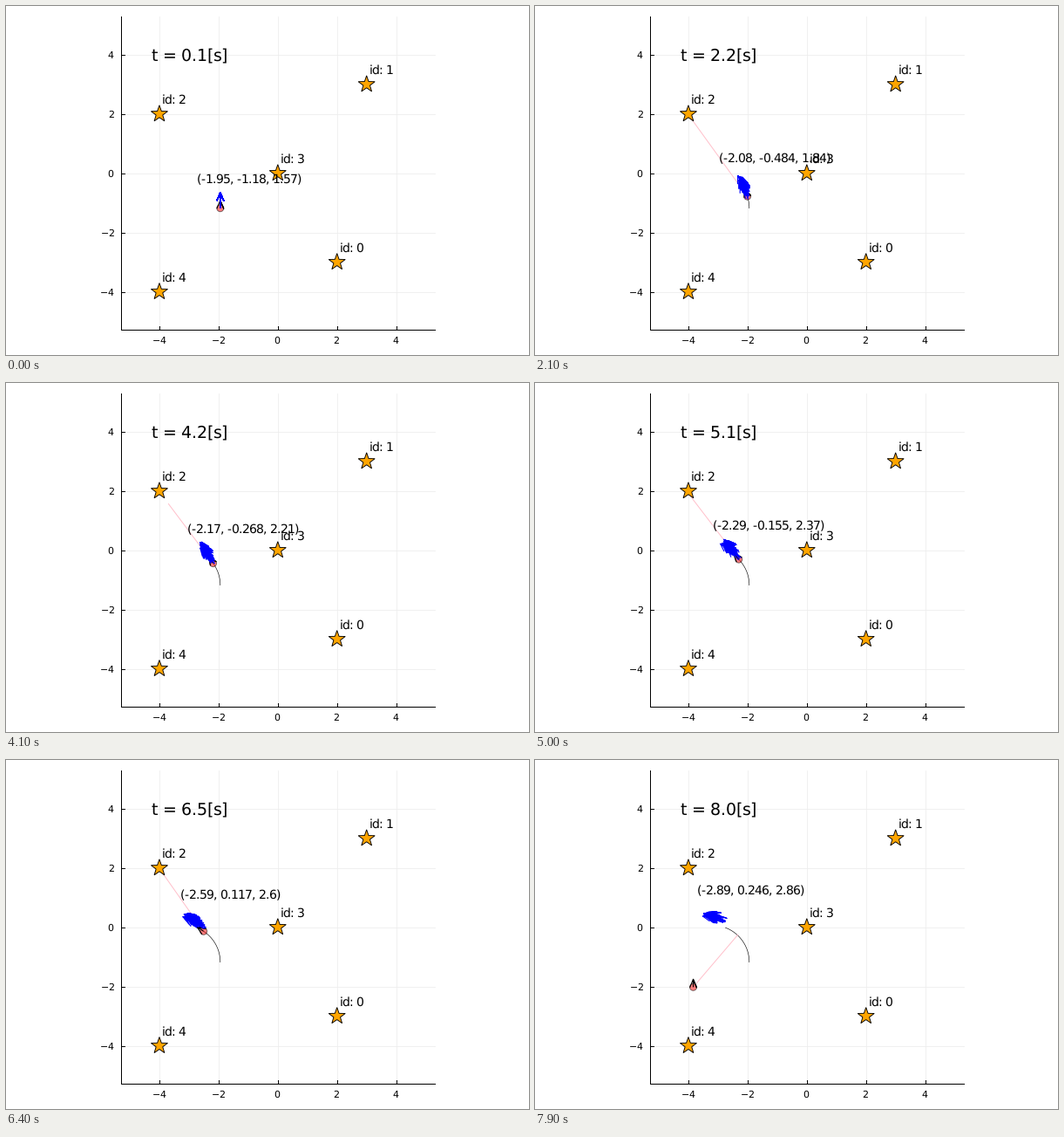
These frames come from a looping animation (600 by 400 pixels, 8 s). A matplotlib script:

```python
from functools import lru_cache

import numpy as np
import matplotlib.pyplot as plt
from matplotlib.animation import FuncAnimation
from matplotlib.collections import LineCollection
from matplotlib.patches import Circle, PathPatch, Polygon
from matplotlib.path import Path
from matplotlib.textpath import TextPath

W, H, DPI = 600, 400, 100
PX = 72 / DPI                        # one pixel in points
FRAMES, STEP = 80, 100
CX, CY, UNIT = 311.8, 191.7, 33.96   # plot centre and pixels per metre
LEFT, RIGHT, TOP, BOTTOM = 132, 492, 12, 371
SMALL, MEDIUM, LARGE = (round(pt * DPI / 72) for pt in (8, 10, 14))
FONT = {"family": "DejaVu Sans"}

LANDMARKS = [(2, -3), (3, 3), (-4, 2), (0, 0), (-4, -4)]

# The robot drives a circular arc, then is carried off at the last step
T0, START = 0.1, (245.8, 231.7)
SPEED, TURN = 6.55, 0.155            # px/s and rad/s
KIDNAPPED, LAST_SIGHT = (181.5, 260.3, np.pi / 2), (233, 200)

# Particle cloud: drift from the true path and spread
DRIFT, CLOUD_TURN, COUNT = (-0.35, -1.1), 0.162, 40

# Key estimates: time, x, y, heading
EST = np.array([
    (0.1, -1.95, -1.18, 1.57), (1.0, -1.97, -0.854, 1.72),
    (2.2, -2.08, -0.484, 1.84), (4.2, -2.17, -0.268, 2.21),
    (5.9, -2.39, -0.0549, 2.52), (7.1, -2.8, 0.289, 2.69),
    (8.0, -2.89, 0.246, 2.86),
])


def to_px(x, y):
    return CX + x * UNIT, CY - y * UNIT


@lru_cache(None)
def advance(ch):
    """Advance width of a glyph in em."""
    right = [TextPath((0, 0), s, size=100, prop=FONT).get_extents().x1
             for s in (ch + "|", "|")]
    return (right[0] - right[1]) / 100


@lru_cache(None)
def glyph(ch, size):
    path = TextPath((0, 0), ch, size=size, prop=FONT)
    return Path(path.vertices * (1, -1), path.codes)


def text_path(text, x, y, size, align=0.5):
    """Text with whole-pixel advances, placed by its ink and centred on y."""
    pen, verts, codes = 0, [], []
    for ch in text:
        if ch != " ":
            g = glyph(ch, size)
            verts.append(g.vertices + (pen, 0))
            codes.append(g.codes)
        pen += int(advance(ch) * size)
    path = Path(np.concatenate(verts), np.concatenate(codes))
    box = path.get_extents()
    dx = round(x - box.x0 - align * box.width)
    dy = round(y + 0.365 * size)
    return Path(path.vertices + (dx, dy), path.codes)


def arrow(x, y, heading, length, back=9, half=3.9):
    d = np.array([np.cos(heading), -np.sin(heading)])
    n = np.array([-d[1], d[0]])
    tail = np.array([x, y])
    tip = tail + length * d
    base = tip - back * d
    return [tail, tip, base + half * n, tip, base - half * n]


def number(v):
    s = f"{v:.3g}"
    return s if "." in s else s + ".0"


def robot_at(t):
    a, r = TURN * (t - T0), SPEED / TURN
    return (START[0] - r * (1 - np.cos(a)), START[1] - r * np.sin(a),
            np.pi / 2 + a)


def particles(i, t):
    age = t - T0
    x, y, _ = robot_at(t)
    x, y = x + DRIFT[0] * age, y + DRIFT[1] * age
    heading = np.pi / 2 + CLOUD_TURN * age
    noise = np.random.default_rng(100 + i).normal(size=(3, COUNT)).clip(-2, 2)
    grow = min(1, age)
    along, bend = 3 * grow * noise[0], 0.05 * grow * noise[2]
    side = 1.7 * min(1, age / 3) * noise[1]
    c, s = np.cos(heading), np.sin(heading)
    poses = zip(x + along * c + side * s, y - along * s + side * c, heading + bend)
    return [arrow(*p, 0.52 * UNIT) for p in poses]


def sighting(i, x, y):
    """Noisy range and bearing reading of landmark 2."""
    ray = np.array(to_px(*LANDMARKS[2])) - (x, y)
    reach, turn = np.random.default_rng(500 + i).normal(0, (0.08, 0.04))
    return (x, y) + (1 + reach) * ray + turn * np.array([-ray[1], ray[0]])


fig = plt.figure(figsize=(W / DPI, H / DPI), dpi=DPI, facecolor="white")
ax = fig.add_axes([0, 0, 1, 1])
ax.set(xlim=(0, W), ylim=(H, 0))
ax.axis("off")


def line(xs, ys, color="black", width=1.0, z=1):
    return ax.plot(xs, ys, color=color, lw=width * PX, zorder=z)[0]


def add_text(*args):
    return ax.add_patch(PathPatch(text_path(*args), fc="black", lw=0, zorder=8))


def add_arrows(color, width, z):
    arrows = LineCollection([], colors=color, linewidths=width * PX, zorder=z)
    return ax.add_collection(arrows, autolim=False)


for v in range(-4, 5, 2):
    gx, gy = to_px(v, v)
    line([gx, gx], [TOP, BOTTOM], "#ededed", 0.8, 0)
    line([LEFT, RIGHT], [gy, gy], "#ededed", 0.8, 0)
    line([gx, gx], [BOTTOM, BOTTOM - 4])
    line([LEFT, LEFT + 4], [gy, gy])
    label = str(v).replace("-", "\u2212")
    add_text(label, gx, 382.5, SMALL)
    add_text(label, 123.5, gy, SMALL, 1)
line([LEFT, LEFT, RIGHT], [TOP, BOTTOM, BOTTOM])

angles = -np.pi / 2 + np.arange(10) * np.pi / 5
radii = np.where(np.arange(10) % 2, 4.0, 10)
star = np.column_stack([radii * np.cos(angles), radii * np.sin(angles)])
for k, spot in enumerate(LANDMARKS):
    sx, sy = to_px(*spot)
    ax.add_patch(Polygon(star + (sx, sy), fc="orange", ec="black",
                         lw=0.9 * PX, joinstyle="miter", zorder=3))
    add_text(f"id: {k}", sx + UNIT / 2, sy - UNIT / 2, MEDIUM)

trail = line([], [], width=0.6, z=2)
beam = line([], [], "pink", z=2)
body = ax.add_patch(Circle((0, 0), 4, fc=(1, 0, 0, 0.5), ec=(0, 0, 0, 0.5),
                           lw=PX, zorder=4))
nose = add_arrows("black", 1.1, 5)
cloud = add_arrows("blue", 1.1, 6)
clock = add_text("t", 0, 0, LARGE)
pose = add_text("0", 0, 0, MEDIUM)


def draw(i):
    t = (i + 1) / 10
    carried = i == FRAMES - 1
    x, y, heading = KIDNAPPED if carried else robot_at(t)
    trail.set_data(*robot_at(np.arange(1, min(i + 2, FRAMES)) / 10)[:2])
    body.center = x, y
    nose.set_segments([arrow(x, y, heading, 9, back=9.5)])

    ox, oy = LAST_SIGHT if carried else sighting(i, x, y)
    beam.set_data([x, ox], [y, oy])
    beam.set_visible(i > 0)

    cloud.set_segments(particles(i, t))
    est = [np.interp(t, EST[:, 0], col) for col in EST.T[1:]]
    ex, ey = to_px(*est[:2])
    label = "(" + ", ".join(map(number, est)) + ")"
    pose.set_path(text_path(label, ex + UNIT, ey - UNIT, MEDIUM))
    clock.set_path(text_path(f"t = {t:.1f}[s]", *to_px(-3, 4), LARGE))
    return trail, beam, body, nose, cloud, pose, clock


anim = FuncAnimation(fig, draw, frames=FRAMES, interval=STEP,
                     repeat=True, repeat_delay=0, blit=False)
plt.show()
```
